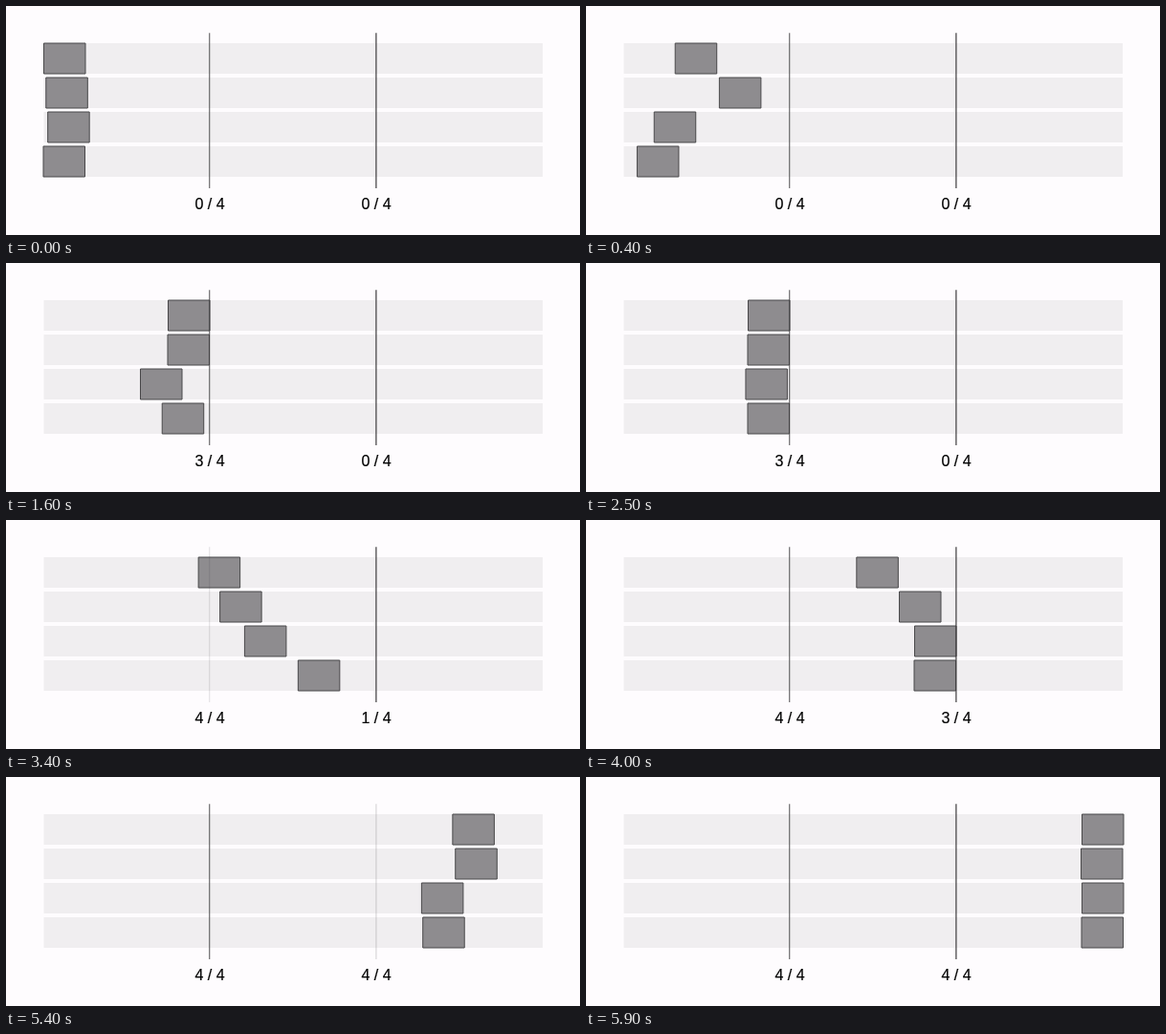
An HTML page with a canvas for the animation above (6000 ms loop, 600 by 240 pixels).

```html
<!DOCTYPE html>
<html lang="en">
<head>
<meta charset="utf-8">
<title>Barrier</title>
<style>
  html, body { margin: 0; width: 100%; height: 100%; overflow: hidden; background: #fefcfe; }
  canvas { display: block; }
  .count {
    position: absolute; top: 199px; width: 60px;
    font: 16px/18px "Liberation Sans", Arial, sans-serif;
    -webkit-text-stroke: 0.2px #000;
    text-align: center; color: #000;
  }
</style>
</head>
<body>
<canvas id="stage" width="600" height="240"></canvas>
<div class="count" style="left:183px"></div>
<div class="count" style="left:357px"></div>
<script>
const LOOP = 6000, STEP = 100;
const LEFT = 39, SECTION = 174, TOP = 39, PITCH = 36, BOX_HEIGHT = 32;
const COUNT_LEAD = 300, FADE_DELAY = 80, FADE = 1000;
const ctx = document.getElementById("stage").getContext("2d");
const labels = document.querySelectorAll(".count");

const smooth = u => (1 - Math.cos(Math.PI * u)) / 2;
const slowing = u => Math.sin(Math.PI * u / 2);
const leg = (ease, duration, delay = 0) => ({ ease, duration, delay });

// One row per worker: its legs to the first barrier, the second and the end.
const workers = [
  [leg(smooth, 900), leg(smooth, 1890), leg(slowing, 1020, 132)],
  [leg(slowing, 730, -10), leg(smooth, 1400), leg(slowing, 1150, 47)],
  [leg(slowing, 2930, -60), leg(smooth, 1118), leg(smooth, 1050, 102)],
  [leg(smooth, 1850), leg(smooth, 766), leg(smooth, 1050, 95)]
];
const stops = [LEFT, LEFT + SECTION - 44, LEFT + 2 * SECTION - 44, LEFT + 3 * SECTION - 43];

// Every leg starts once the slowest worker has finished the one before.
const arrivals = [0, 1, 2].map(() => []);
let release = 0;
arrivals.forEach((times, i) => {
  for (const legs of workers) {
    legs[i].start = release + legs[i].delay;
    times.push(legs[i].start + legs[i].duration);
  }
  release = Math.max(...times);
});

const barriers = [{ x: 212.75, width: 0.9 }, { x: 386.9, width: 1.2 }];

const progress = (t, start, duration) => Math.min(1, Math.max(0, (t - start) / duration));

function position(legs, t) {
  return legs.reduce((x, { ease, start, duration }, i) =>
    x + (stops[i + 1] - stops[i]) * ease(progress(t, start, duration)), LEFT);
}

function drawWorker(legs, row, t) {
  const x = position(legs, t) - (row % 2) / 2;
  ctx.beginPath();
  ctx.rect(x + 0.5, TOP + row * PITCH, 43.5, BOX_HEIGHT);
  ctx.fill();
  ctx.stroke();
}

function drawBarrier({ x, width }, i, t) {
  const opens = Math.max(...arrivals[i]) + FADE_DELAY;
  ctx.globalAlpha = 1 - 0.84 * Math.sin(Math.PI * progress(t, opens, FADE)) ** 2;
  ctx.lineWidth = width;
  ctx.beginPath();
  ctx.moveTo(x, 28.3);
  ctx.lineTo(x, 191);
  ctx.stroke();
  ctx.globalAlpha = 1;
  const count = arrivals[i].filter(at => at - COUNT_LEAD <= t).length;
  labels[i].textContent = count + " / 4";
}

function draw(t) {
  ctx.fillStyle = "#fefcfe";
  ctx.fillRect(0, 0, 600, 240);

  ctx.fillStyle = "#f0eef0";
  workers.forEach((_, row) =>
    ctx.fillRect(LEFT + 0.5, TOP + row * PITCH, 3 * SECTION - 0.5, BOX_HEIGHT));

  ctx.fillStyle = "#8e8c8f";
  ctx.strokeStyle = "#49484a";
  ctx.lineWidth = 1;
  workers.forEach((legs, row) => drawWorker(legs, row, t));

  ctx.strokeStyle = "#3c3b3d";
  barriers.forEach((barrier, i) => drawBarrier(barrier, i, t));
}

const begin = performance.now();
function tick() {
  const t = (performance.now() - begin) % LOOP;
  draw(Math.floor(t / STEP) * STEP);
  requestAnimationFrame(tick);
}
tick();
</script>
</body>
</html>
```
